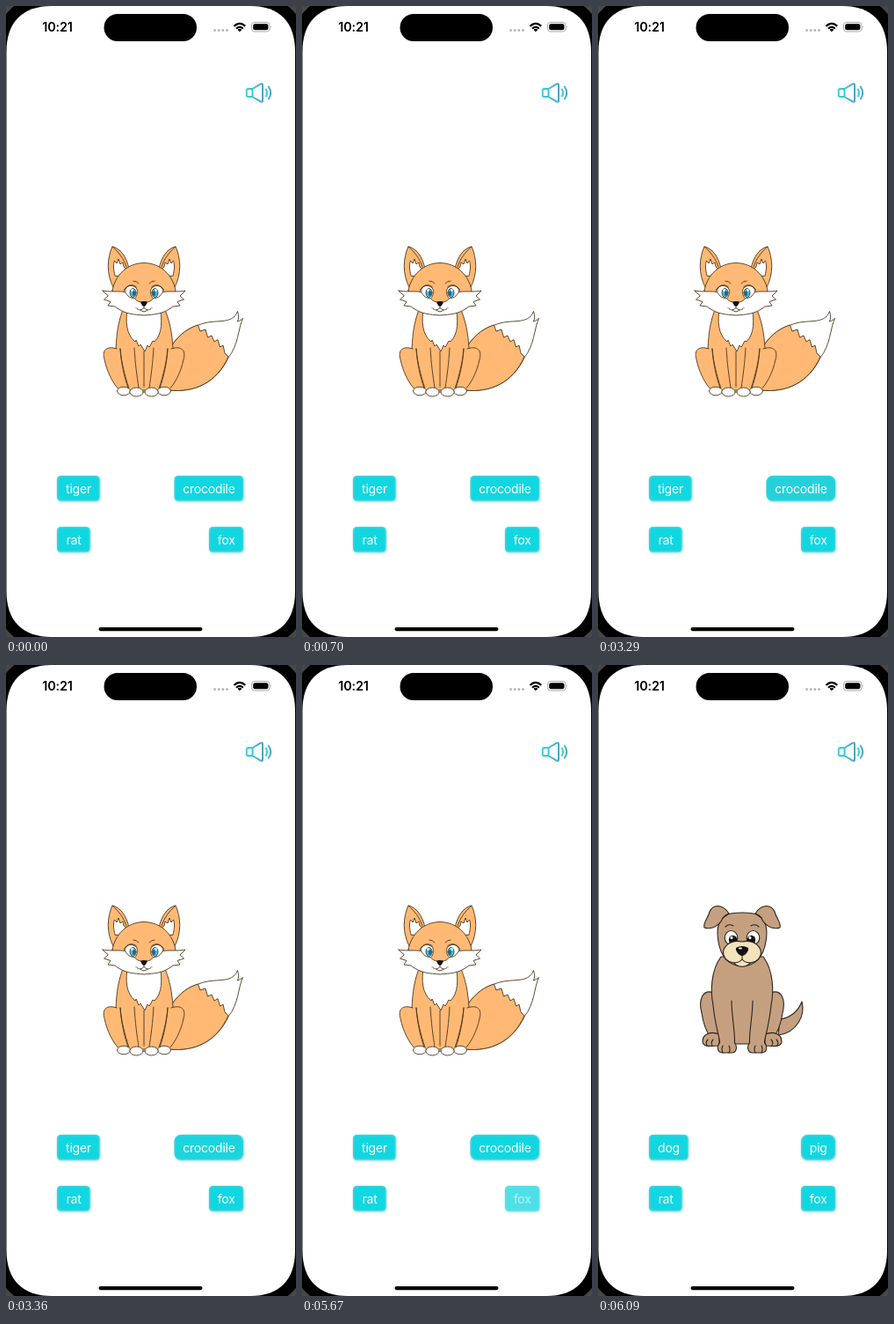
Animation, 330 px wide and 716 px high, one loop 8000 ms. Source, as an HTML page:

```html
<!DOCTYPE html>
<html lang="en">
<head>
<meta charset="utf-8">
<title>Animal quiz</title>
<style>
html, body { margin: 0; width: 100%; height: 100%; overflow: hidden; background: #000; }
svg { display: block; width: 330px; height: 716px; }
text { font-family: Inter, Roboto, sans-serif; }
.label { font-size: 14px; letter-spacing: -.2px; fill: #fff; text-anchor: middle; }
.clock { font-size: 14.5px; font-weight: 600; letter-spacing: -.2px; }
.art { stroke-linejoin: round; stroke-linecap: round; stroke-width: .9; }
#fox { stroke: #49371f; fill: #ffb974; }
#dog { stroke: #2b241d; fill: #c5a080; stroke-width: 1.1; }
.w { fill: #fff; }
.n { fill: none; }
</style>
</head>
<body>
<svg id="stage" viewBox="0 0 330 716" xmlns="http://www.w3.org/2000/svg">
  <defs>
    <linearGradient id="sound" x1="0" x2="1">
      <stop offset="0" stop-color="#36d2dc"/><stop offset="1" stop-color="#48a6c6"/>
    </linearGradient>
    <filter id="soft" x="-15%" y="-25%" width="130%" height="150%"><feGaussianBlur stdDeviation=".8"/></filter>
  </defs>
  <rect width="330" height="716" fill="#484848"/>
  <rect x="-12" y="-12" width="354" height="740" rx="56" fill="#000"/>
  <path fill="#fff" d="M52 0H278C311 0 329 18 329 52V664C329 698 311 716 278 716H52C19 716 0.500 698 0.500 664V52C0.500 18 19 0 52 0Z"/>
  <rect x="111.500" y="9" width="105.500" height="31" rx="15.500"/>
  <rect x="105.500" y="705" width="118" height="4.200" rx="2.100"/>
  <text class="clock" x="41.300" y="29.200">10:21</text>
  <g fill="#b8b8b8">
    <circle cx="237.700" cy="27.500" r="1.500"/><circle cx="242.300" cy="27.500" r="1.500"/>
    <circle cx="246.900" cy="27.500" r="1.500"/><circle cx="251.500" cy="27.500" r="1.500"/>
  </g>
  <g fill="none" stroke="#000" stroke-width="2.200">
    <path d="M259.500 22.900Q265.900 17 272.300 22.900M262 25.700Q265.900 22 269.800 25.700"/>
    <path d="M264 26.900L265.900 28.800L267.800 26.900Q265.900 25.500 264 26.900Z" fill="#000" stroke-width="1"/>
  </g>
  <rect x="279.500" y="18.500" width="20.500" height="10.500" rx="3.300" fill="none" stroke="#aaa"/>
  <rect x="281.200" y="20.200" width="17.200" height="7.100" rx="2"/>
  <path d="M301.300 22Q303 23.700 301.300 25.500Z" fill="#aaa"/>
  <g fill="none" stroke="url(#sound)" stroke-width="2" stroke-linejoin="round" stroke-linecap="round">
    <path d="M280.500 94H275.500Q273.800 94 273.800 95.700V101.300Q273.800 103 275.500 103H280.500L290 108.600Q292 109.400 292 107.300V89.700Q292 87.600 290 88.400ZV103"/>
    <path d="M295.800 94.500Q298.300 98.500 295.800 102.500M298.800 91.500Q303.600 98.500 298.800 105.500"/>
  </g>
  <g id="fox" class="art"></g>
  <g id="dog" class="art"></g>
  <g id="buttons"></g>
</svg>
<script>
const $ = id => document.getElementById(id);
const path = (d, cls = '') => `<path class="${cls}" d="${d}"/>`;
const oval = (x, y, rx, ry, style = '') => `<ellipse cx="${x}" cy="${y}" rx="${rx}" ry="${ry}" style="${style}"/>`;
const pair = (cx, part) => part + `<g transform="translate(${2 * cx}) scale(-1 1)">${part}</g>`;
const WHITE = 'fill:#fff', INK = 'fill:#111;stroke:none', SHINE = 'fill:#fff;stroke:none';

$('fox').innerHTML =
  // tail
  path('M188 386C198 371 209 365 219 362C238 354 257 363 263.500 346.500C265 351 265 354 263.500 358C266 357 268 356 269.500 354.500C264 366 265 384 253 399C240 427 215 439 186 436Z', 'w') +
  path('M188 386C198 371 209 365 218.500 362L221 369L227 367L229.500 376L234 374L237 381L241 378.500L243.500 387L247 385L249 394L253 398C240 427 215 439 186 436Z') +
  // body
  path('M136 338C127 357 126 372 125 389L133 436H181L190 389C189 372 187 357 178 338Z') +
  pair(157, path('M126 389C114 385 109 391 112 401C115 416 122 429 130 437L140 434C135 419 131 403 130 389') +
    path('M130 389C131 406 135 422 139 434M146 388C147 405 149 421 151 433', 'n')) +
  path('M157 392V432', 'n') +
  path('M139 340C135 358 137 373 147 381L148 379L151 386L153 384L158 392L161 385L163 387L167 380L169 381C178 372 178 357 175 340Z', 'w') +
  pair(157, oval(134, 437, 7.5, 4.8, WHITE) + oval(148.500, 438, 7.7, 5, WHITE)) +
  // ears and head
  pair(157, path('M122 319C114 304 115 286 121 273C130 275 137 284 140 298Z') +
    path('M124 306C122 298 122 293 123.500 289L126 292L128 287L130 293L133 291L134 296L137 298L130 306Z', 'w') +
    path('M121 273C129 280 134 287 137 296', 'n')) +
  path('M121 323C124 306 137 292 157 291.500C177 292 190 306 193 323C189 339 173 349 157 350C141 349 125 339 121 323Z') +
  path('M110 323C124 326 138 320 146 331C149 336 153 336 157 336C161 336 165 336 168 331C176 320 190 326 204 323L198 329L202.500 333L195 335.500L198 340L190 341C179 350 168 350 157 351C146 350 135 350 124 341L116 340L119 335.500L111.500 333L116 329Z', 'w') +
  // face
  pair(157, path('M135 323C137 317 144 315 149 321C150 326 149 330 146 332C140 331 137 328 135 323Z', 'w') +
    oval(144.500, 325.500, 3.500, 5, 'fill:#49bde4') + oval(145.500, 326, 1.500, 3, 'fill:#176b91;stroke:none') +
    oval(143.500, 322.500, 1.200, 1.400, SHINE) +
    path('M134.500 322C138 316 144 315 148.500 319M145 312Q149 312 151 315', 'n')) +
  path('M157 342C155 346 151 346 148 342.500M157 342C159 346 163 346 166 342.500M153 345Q157 349 161 345', 'n') +
  `<path d="M153 336Q157 334 161 336Q159 341 157 341Q155 341 153 336Z" style="${INK}"/>`;

$('dog').innerHTML =
  path('M207 402C220 400 228 392 232 382C236 397 227 417 205 420Z') +
  pair(164, path('M132 372C119 367 114 380 118 395C120 408 124 417 128 422L142 428V380Z') +
    path('M138 419C128 415 119 419 119 427C119 433 126 433 138 432Z') +
    path('M124 432Q122 428 125 425M130 432Q128 428 131 425', 'n')) +
  path('M140 331C128 347 128 371 131 386C133 408 138 421 139 430H189C190 421 195 408 197 386C200 371 200 347 188 331Z') +
  pair(164, path('M139 428C135 432 135 440 142 440H152C158 440 159 433 155 428Z') +
    `<path d="M139.500 420L154.500 420L155 430L139 430Z" stroke="none"/>` +
    path('M152 381C152 398 156 415 155.500 429M142 440Q140 436 142 432M149 440Q151 436 149 432', 'n')) +
  // head
  path('M144 284C154 280 174 280 184 284C192 291 193 303 191 314C188 332 179 341 164 342C149 341 140 332 137 314C135 303 136 291 144 284Z') +
  pair(164, path('M149 282C142 271 131 271 127 280C125 288 119 293 121 298C130 301 139 295 142 287Z') +
    path('M142 287Q144 284 149 282M145 297Q149 293 154 296', 'n') +
    oval(151.500, 309.500, 7.3, 8, WHITE)) +
  oval(153.500, 312, 4.700, 5.200, INK) + oval(174.500, 312, 4.700, 5.200, INK) +
  oval(152, 309.500, 1.500, 1.700, SHINE) + oval(173, 309.500, 1.500, 1.700, SHINE) +
  `<g fill="#f2e3bd">` +
  path('M153 334C155 345 173 345 175 334Z') +
  path('M164 314C149 311 141 321 143 329C146 339 159 340 164 334C169 340 182 339 185 329C187 321 179 311 164 314Z') + '</g>' +
  path('M164 329V334', 'n') +
  `<path d="M157 321Q164 317 171 321C172 325 167 330 164 330C161 330 156 325 157 321Z" style="${INK}"/>` +
  oval(162, 321.500, 2, .9, SHINE);

// word: [x, y, width]
const BUTTONS = {
  tiger: [58, 533, 49],
  dog: [58, 533, 45],
  crocodile: [191.5, 533, 79],
  pig: [231, 533, 39.5],
  rat: [58, 591, 38],
  fox: [231, 591, 39.5]
};
const button = ([word, [x, y, w]]) => `<g id="${word}-button">
  <rect class="rim" x="${x + .3}" y="${y + .6}" width="${w}" height="29" fill="#77d9df" filter="url(#soft)"/>
  <rect class="rim edge" x="${x}" y="${y}" width="${w - .5}" height="28.500"/>
  <rect class="face" x="${x + 1.7}" y="${y + 1.5}" width="${w - 3.5}" height="25.500"/>
  <text class="label" x="${x + w / 2}" y="${y + 19.8}">${word}</text></g>`;
$('buttons').innerHTML = Object.entries(BUTTONS).map(button).join('');

// look: [face, edge, text opacity]
const LOOKS = {
  rest: ['#10d7e1', '#3fd0d9', 1],
  pressed: ['#4fe0e7', '#5edde4', .6],
  dim: ['#24d1db', '#2fcfd8', 1],
  rising: ['#1ad4de', '#36d0d9', 1]
};
// [start, look, round corners]
const IDLE = [[0, 'rest', 0]];
const STEPS = {
  crocodile: [[0, 'rest', 0], [2030, 'pressed', 0], [3290, 'dim', 1], [3360, 'rising', 1], [3500, 'rest', 1]],
  fox: [[0, 'rest', 0], [5670, 'pressed', 0], [6090, 'rest', 0]],
  pig: [[0, 'rest', 1]]
};
const SWAP = 6090, LOOP = 8000;

function paint(word, look, round) {
  const [face, edge, ink] = LOOKS[look];
  const set = (part, name, value) =>
    $(word + '-button').querySelectorAll(part).forEach(el => el.setAttribute(name, value));
  set('.face', 'fill', face);
  set('.edge', 'fill', edge);
  set('.face', 'rx', round ? 6.5 : 3.5);
  set('.rim', 'rx', round ? 7.5 : 4.5);
  set('text', 'fill-opacity', ink);
}
const show = (ids, on) => ids.forEach(id => $(id).style.display = on ? '' : 'none');

function draw(t) {
  for (const word in BUTTONS) {
    const [, look, round] = (STEPS[word] || IDLE).filter(step => step[0] <= t).pop();
    paint(word, look, round);
  }
  show(['fox', 'tiger-button', 'crocodile-button'], t < SWAP);
  show(['dog', 'dog-button', 'pig-button'], t >= SWAP);
}
const start = performance.now();
function tick() {
  draw(Math.max(0, performance.now() - start) % LOOP);
  requestAnimationFrame(tick);
}
draw(0);
requestAnimationFrame(tick);
</script>
</body>
</html>
```
